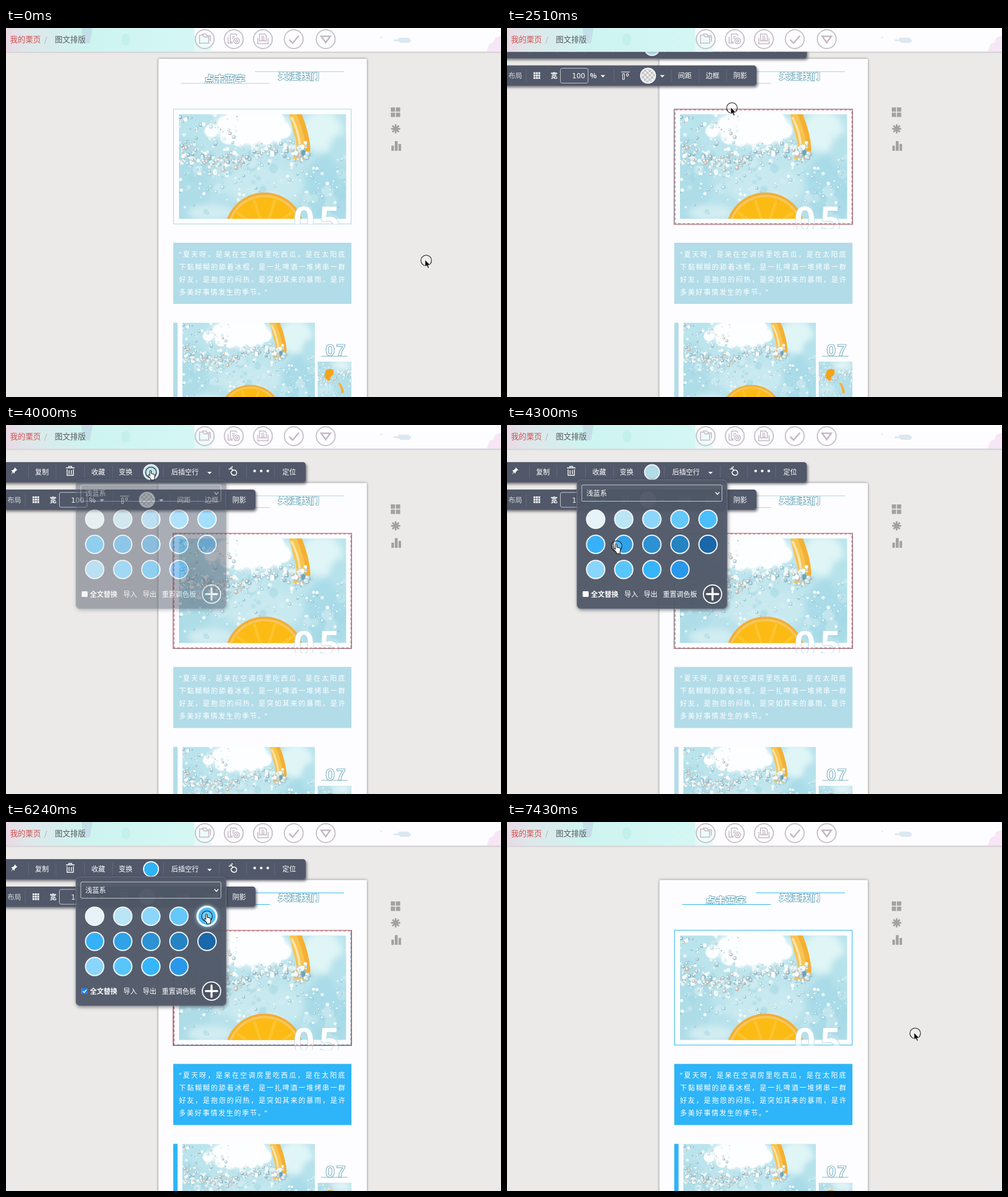
An HTML page for the animation above (8000 ms loop, 867 px wide and 646 px high).

```html
<!DOCTYPE html>
<html lang="zh-CN">
<head>
<meta charset="utf-8">
<style>
html, body { margin: 0; width: 100%; height: 100%; overflow: hidden; background: #ebeae9; }
svg { display: block; width: 867px; height: 646px; }
text { font-family: 'Noto Sans CJK SC', 'Noto Sans CJK', 'Noto Sans', sans-serif; font-size: 12px; white-space: pre; }
.bar > rect:first-child { fill: #515869; }
.bar { filter: drop-shadow(2px 3px 2px rgba(40, 40, 50, .6)); }
.bar text, #palette text { fill: #fff; }
.sep { stroke: #626979; }
.ring { stroke: #f4f6f8; stroke-width: 2; }
.accent { fill: var(--fill); }
.line { stroke: var(--line); fill: none; }
.outline { font-size: 18px; fill: #fff; stroke: #6fa9bb; stroke-width: 1.8; paint-order: stroke; font-weight: 900; }
.body { fill: #fff; font-weight: 500; }
.quote { font-family: 'Noto Sans', sans-serif; }
.big { font: 700 66px 'Noto Sans', 'Open Sans', sans-serif; fill: #fff; stroke: #a9d5e2; stroke-width: .8; letter-spacing: 7px; }
.small { font: 700 30px 'Liberation Sans', sans-serif; fill: #fff; stroke: #7db1c4; stroke-width: 1.2; letter-spacing: 2px; }
</style>
</head>
<body>
<svg id="stage" viewBox="0 0 867 646"></svg>
<script>
const stage = document.getElementById('stage');

let seed = 7;
const rnd = () => (seed = (seed * 16807) % 2147483647) / 2147483647;
const span = (a, b) => a + rnd() * (b - a);
const bell = () => (rnd() + rnd() + rnd() - 1.5) / 1.5;
const pick = list => list[Math.floor(rnd() * list.length)];
const times = (n, f) => Array.from({ length: n }, (_, i) => f(i)).join('');

const text = (x, y, s, attrs = '') => `<text x="${x}" y="${y}" ${attrs}>${s}</text>`;
const rect = (x, y, w, h, attrs = '') => `<rect x="${x}" y="${y}" width="${w}" height="${h}" ${attrs}/>`;
const disc = (x, y, r, attrs = '') => `<circle cx="${x}" cy="${y}" r="${r}" ${attrs}/>`;
const blob = (x, y, rx, ry, fill) => `<ellipse cx="${x}" cy="${y}" rx="${rx}" ry="${ry}" fill="${fill}"/>`;
const path = (d, attrs = '') => `<path d="${d}" ${attrs}/>`;
const seps = (list, y) => list.map(x => path(`M${x} ${y}v22`, 'class="sep"')).join('');
const caret = (x, y) => path(`M${x - 4} ${y}h8l-4 4z`, 'fill="#fff"');
const labels = (list, y, attrs) => list.map(([x, s]) => text(x, y, s, attrs)).join('');
const dot = (x, y, r, fill) => disc(x.toFixed(1), y.toFixed(1), r.toFixed(1), `fill="${fill}"`);

// a bubble is a tinted disc with a pale highlight
const bubble = (x, y, r, fill) => dot(x, y, r, fill) + (r > 1.8 ? dot(x - r * .25, y - r * .2, r * .5, '#f1fafb') : '');

function bubbles() {
  const greys = ['#a3c4ce', '#b3d2da', '#c9e2e7', '#94bac7', '#eef8f9', '#dceff2', '#c6bcb2', '#fff'];
  const blues = ['#a3d2de', '#b0dae4', '#f0fafb', '#fff', '#94c5d4', '#daf0f4'];
  const band = times(260, () => {
    const x = span(5, 228);
    return bubble(x, 72 + 12 * Math.sin(x / 38) + bell() * 26, span(.8, 4.2), pick(greys));
  });
  const loose = times(150, () => bubble(span(0, 292), 112 + bell() * 72, span(.5, 3.4), pick(blues)));
  const rising = times(60, () => bubble(span(0, 105), span(2, 62), span(.7, 3.6), pick(greys)));
  return band + loose + rising;
}

const foam = times(70, () => dot(122 + bell() * 75, 20 + bell() * 34, span(5, 14), '#fdfeff'));
const glints = times(55, () => dot(span(0, 292), span(70, 183), span(3, 11), pick(['#d8eff4', '#a5d7e4', '#c9e9ef'])));

const slice = disc(150, 207, 70, 'fill="#f3ae35"') + disc(150, 207, 66, 'fill="#f8c65c"') +
  disc(150, 207, 62, 'fill="#fcbb14"') +
  times(4, i => {
    const a = Math.PI * (1.2 + i * .2);
    return path(`M150 207L${150 + 60 * Math.cos(a)} ${207 + 60 * Math.sin(a)}`, 'stroke="#fdc42e" stroke-width="5"');
  });

const peel = path('M193 0H215Q228 32 230 60Q229 78 214 82L199 77Q211 60 201 33Z', 'fill="#f8c450"') +
  path('M206 0H215Q228 32 230 60Q229 74 222 76Q224 42 206 0Z', 'fill="#f4b033"') +
  path('M197 5Q210 30 212 58', 'fill="none" stroke="#fbe3ac" stroke-width="4"') +
  disc(214, 66, 9, 'fill="#9ec3cf"') + disc(216, 67, 5.5, 'fill="#6ba5ba"') + disc(211, 63, 3.5, 'fill="#dcedf1"');

const water = rect(0, 0, 293, 183, 'fill="url(#water)"') + '<g filter="url(#soft)">' +
  blob(10, 120, 45, 80, '#aedde8') + blob(262, 130, 45, 60, '#a9dbe8') +
  blob(150, 125, 70, 35, '#c8e9ef') + blob(250, 30, 36, 36, '#dff5f6') + blob(285, 65, 22, 30, '#b6e2eb') +
  blob(128, 22, 66, 30, '#fff') + blob(55, 172, 40, 14, '#d2edf2') + '</g>' +
  `<g filter="url(#blur)">${foam}<g opacity=".55">${glints}</g></g>`;

const defs = `<defs>
  <linearGradient id="water" x2="0" y2="1"><stop stop-color="#b9e4ed"/><stop offset=".5" stop-color="#bfe5ed"/><stop offset="1" stop-color="#b3dfea"/></linearGradient>
  <linearGradient id="wash"><stop stop-color="#ead9e5"/><stop offset=".1" stop-color="#dfe6ea"/><stop offset=".42" stop-color="#cef4f0"/><stop offset="1" stop-color="#d4f7f4"/></linearGradient>
  <filter id="soft"><feGaussianBlur stdDeviation="6"/></filter>
  <filter id="blur"><feGaussianBlur stdDeviation="1"/></filter>
  <filter id="lens"><feGaussianBlur stdDeviation=".5"/></filter>
  <pattern id="check" width="8" height="8" patternUnits="userSpaceOnUse"><path fill="#eee" d="M0 0h8v8H0z"/><path fill="#c4c4c4" d="M0 0h4v4H0zM4 4h4v4H4z"/></pattern>
  <clipPath id="photoClip">${rect(0, 0, 292.5, 183)}</clipPath>
  <clipPath id="thumbClip">${rect(546, 584, 59, 90)}</clipPath>
  <clipPath id="headA">${rect(300, 70, 170, 27)}</clipPath>
  <clipPath id="headB">${rect(430, 77, 170, 27)}</clipPath>
  <clipPath id="numClip"><rect id="numBox" x="490" y="300" width="115" height="43"/></clipPath>
  <g id="bubbles" filter="url(#lens)">${bubbles()}</g>
  <g id="photo" clip-path="url(#photoClip)">${water}${peel}<use href="#bubbles"/>${slice}</g>
</defs>`;

const bodyLine = (x, y, s, gap) => text(x, y, s, `class="body" letter-spacing="${gap}"`);
const quote = (x, y, s) => text(x, y, s, 'class="body quote"');

const thumb = `<g clip-path="url(#thumbClip)">${rect(546, 584, 59, 90, 'fill="#b3dfe9"')}
  <g filter="url(#soft)">${blob(588, 590, 18, 9, '#e6f6f8')}${blob(560, 634, 14, 9, '#d3edf3')}</g>
  <use href="#bubbles" transform="translate(540 573) scale(.32 .5)"/>
  ${path('M560 600q7-6 14-1l-1 9q-6 1-6 10q-8-2-9-10z', 'fill="#f5a31a"')}
  ${path('M584 620q7 8 8 18l-5 2q1-9-5-17z', 'fill="#f3b13a"')}</g>`;

const page = `<g id="page">
  ${rect(267, 54, 365, 720, 'rx="2" fill="#fdfdff" style="filter:drop-shadow(0 0 2px rgba(0,0,0,.45))"')}
  <g clip-path="url(#headA)">${text(347, 97, '点击蓝字', 'class="outline"')}</g>
  <g clip-path="url(#headB)">${text(476.5, 90, '关注我们', 'class="outline"')}</g>
  ${path('M307 97H462M436 76.5H592', 'class="line"')}
  <use href="#photo" x="303" y="151"/>
  ${rect(293.5, 142, 311, 201, 'class="line"')}
  <g clip-path="url(#numClip)">${text(503, 360, '05', 'class="big"')}</g>
  <g id="hover">${rect(293.5, 142, 311, 201, 'fill="none" stroke="#4cbbdc" stroke-dasharray="4 1.5"')}</g>
  <g id="picked" fill="none">${rect(292.5, 142, 313, 202, 'stroke="#ab6068"')}
    ${rect(294.5, 143.5, 309.5, 199, 'stroke="#c2606a" stroke-dasharray="5 3"')}</g>
  <g id="spacer">${rect(293.5, 109, 311, 23, 'fill="none" stroke="#4fb9d2" stroke-dasharray="4 2"')}</g>
  ${rect(293, 376, 312, 107, 'class="accent"')}
  ${quote(303, 400.5, '“')}
  ${bodyLine(310, 400.5, '夏天呀，是呆在空调房里吃西瓜，是在太阳底', 2.3)}
  ${bodyLine(303, 422.5, '下黏糊糊的舔着冰棍，是一扎啤酒一堆烤串一群', 1.95)}
  ${bodyLine(303, 444.5, '好友，是抱怨的闷热，是突如其来的暴雨，是许', 1.95)}
  ${bodyLine(303, 466.5, '多美好事情发生的季节。', 1.8)}${quote(453, 466.5, '”')}
  ${rect(293, 516, 7.5, 200, 'class="accent"')}
  <use href="#photo" transform="translate(309 516) scale(.793)"/>
  ${text(559.5, 574, '07', 'class="small"')}
  ${path('M552 574.5H598', 'stroke="#7db1c4"')}
  ${thumb}
</g>`;

const side = `<g id="side" fill="#a2a2a2">
  ${path('M674 139h7.5v7.5h-7.5zM683 139h7.5v7.5h-7.5zM674 148.3h7.5v7.5h-7.5zM683 148.3h7.5v7.5h-7.5z')}
  <g stroke="#a2a2a2" stroke-width="3">${times(4, i => path('M674.5 176.5h16', `transform="rotate(${i * 45} 682.5 176.5)"`))}</g>
  ${path('M675 206h4.5v9h-4.5zM681 198h5v17h-5zM687.5 203h4.5v12h-4.5z')}
</g>`;

const bars = `<g id="bars"><g class="bar">
  ${rect(-8, 65, 533, 35.5, 'rx="5"')}${seps([39.5, 87.5, 137.5, 186.5, 275.5, 373.5, 421.5, 470.5], 71)}
  ${path('M15 74l5 5-2 .5-3 3 0 3-2.5-2.5-4 4 3-5-2.5-2.5 3-.5 3-3z', 'fill="#fff"')}
  ${path('M105 75h15M110 75v-2.5h5v2.5M107 77.5v10.5h11v-10.5M110.5 79v7M114.5 79v7', 'fill="none" stroke="#fff" stroke-width="1.4"')}
  ${labels([[51, '复制'], [149.5, '收藏'], [197.5, '变换'], [289.5, '后插空行'], [484, '定位']], 87)}
  ${disc(254, 82.5, 13, 'class="accent ring"')}${caret(356.5, 82)}
  ${path('M393 74l5 6M390 77h4M396 72v3M397 79q6-1 7 4q0 5-4 5q-5 0-6-5z', 'fill="none" stroke="#fff" stroke-width="1.5"')}
  ${[435.5, 447, 458.5].map(x => disc(x, 80.5, 2.3, 'fill="#fff"')).join('')}
  </g><g class="bar">
  ${rect(-8, 113, 445, 35.5, 'rx="5"')}${seps([33.5, 187.5, 287.5, 336.5, 384.5], 120)}
  ${text(2.5, 135.5, '布局', 'opacity=".75"')}
  ${times(9, i => rect(46.5 + i % 3 * 4.2, 125 + Math.floor(i / 3) * 4.2, 3.2, 3.2, 'fill="#fff"'))}
  ${text(76.5, 135.5, '宽', 'font-weight="700"')}
  ${rect(93.5, 118, 48.5, 26, 'rx="3" fill="none" stroke="#c6cad2"')}
  ${text(137, 135.5, '100', 'text-anchor="end" style="font-family:\'DejaVu Sans\',sans-serif"')}
  ${text(145.5, 135.5, '%', 'font-weight="700"')}${caret(168, 130)}
  ${path('M200 124.5h15M202.5 127.5h3v10h-3zM209.5 127.5h3v4h-3z', 'fill="none" stroke="#fff"')}
  ${disc(247, 131, 13, 'class="ring" fill="url(#check)"')}${caret(272, 130)}
  ${labels([[299.5, '间距'], [348, '边框'], [396.5, '阴影']], 135.5)}
</g></g>`;

const colors = '#e6f3f8 #b9e5f5 #8dd6fb #64c8fa #4abffc #36b1f8 #30a2e8 #2c92d3 #2483c3 #1a67a9 #8ad5fb #58c6fd #35b6fc #2a98ea'.split(' ');
const swatches = colors.map((c, i) =>
  disc(155.3 + i % 5 * 49.2, 165 + Math.floor(i / 5) * 44, 16, `class="ring" fill="${c}"`)).join('');

const palette = `<g id="palette">
  ${rect(122.5, 96, 263, 225.5, 'rx="7" fill="#515a6b" fill-opacity=".9" stroke="#6f7786" style="filter:drop-shadow(1px 2px 3px rgba(40,40,50,.6))"')}
  ${rect(131, 105, 245.5, 28.5, 'rx="2" fill="none" stroke="#c9cdd4"')}
  ${text(139, 123.5, '浅蓝系')}${path('M365 117.5l3.5 4 3.5-4', 'fill="none" stroke="#fff" stroke-width="1.5"')}
  ${disc(352, 165, 18.5, 'id="glow" fill="#fff" style="filter:drop-shadow(0 0 3px #8fdcff)"')}
  ${swatches}
  ${rect(132.5, 291, 10.5, 10, 'rx="1.5" fill="#fff"')}
  <g id="tick">${rect(132.5, 291, 10.5, 10, 'rx="1.5" fill="#1f7df0"')}${path('M134.8 296l2.2 2.5 4-5', 'fill="none" stroke="#fff" stroke-width="1.6"')}</g>
  ${text(147, 300.5, '全文替换', 'font-weight="700"')}
  ${labels([[205.5, '导入'], [239.5, '导出'], [273, '重置调色板']], 300.5)}
  ${disc(360, 296, 16, 'class="ring" fill="#4b5262"')}${path('M350 296h20M360 286v20', 'stroke="#fff" stroke-width="3.5" stroke-linecap="round"')}
</g>`;

const icons = [
  [348, 'M-9-7h6l2 3h8v11h-16zM-4-7v-2h6l2 3h6v10'],
  [399, 'M-10-4v11h8M-6-9h9l3 3M-6-9v14h4M-3-4h5M-3-1h3M5-2a5 5 0 1 0 .1 0M5 1a2 2 0 1 0 .1 0'],
  [450, 'M-6-9h9l3 3v9h-12zM-3-5h5M-3-2h6M-3 1h6M-9-2v10h18v-10'],
  [504, 'M-8 1l6 6 11-13'],
  [560, 'M-8-5h16l-8 11z'],
].map(([x, d], i) => `<g transform="translate(${x} 19.5)" fill="none">
  ${disc(0, 0, 16.5, 'fill="#fff" fill-opacity=".35" stroke="#c4c1c7" stroke-width="2"')}
  ${path(d, `stroke="#c3b6c2" stroke-width="${i > 2 ? 2.5 : 1.5}"`)}</g>`).join('');

const header = `<g style="filter:drop-shadow(0 1px 1px rgba(90,80,100,.35))">${rect(0, 0, 867, 41.5, 'fill="#fdfcff"')}</g>
  ${rect(0, 0, 330, 41.5, 'fill="url(#wash)"')}
  ${rect(330, 14, 30, 27.5, 'fill="#e5f9f8"')}
  ${path('M132 0h20l-5 27h-9l-4-12z', 'fill="#c5dfe8"')}
  ${blob(210, 20, 8, 11, '#c4f0eb')}
  ${path('M679 20h8v-3h18l5 5-4 4h-15l-4-3h-8z', 'fill="#dce8f1"')}${rect(656, 15, 3, 3, 'fill="#e5edf4"')}
  ${path('M842 41l5-13 7-3 3-8 10-3v27z', 'fill="#f7e6f6"')}
  ${icons}
  ${text(7, 25, '我的栗页', 'fill="#d0504f" style="font-size:13.5px"')}
  ${text(67, 25, '/', 'fill="#aaa" style="font-size:13px"')}
  ${text(85.5, 25, '图文排版', 'fill="#565a5e" style="font-size:13.5px"')}`;

const beam = 'M-3-5q3 0 3 2v7q0 2-3 2M3-5q-3 0-3 2v7q0 2 3 2';
const cursor = `<g id="cursor">
  ${disc(0, 0, 9.3, 'fill="#fff" fill-opacity=".2" stroke="#111" stroke-width="1.1"')}
  <g id="arrow">${path('M-2-1v12l3-2.5 2 5 2-1-2-4.5h4z', 'fill="#000" stroke="#fff" stroke-width=".7"')}</g>
  <g id="move">${disc(0, 0, 8.6, 'fill="#fff"')}${path('M-5 1.5h10M0-4v11', 'stroke="#000" stroke-width="1.8"')}
    ${path('M-7 1.5l3-3v6zM7 1.5l-3-3v6zM0-5.5l-3 3h6zM0 8.5l-3-3h6z')}</g>
  <g id="beam" fill="none">${path(beam, 'stroke="#fff" stroke-width="2.6"')}${path(beam, 'stroke="#222"')}</g>
  <g id="hand">${path('M-2-3q1.5-1.5 2.5 0v5l5 1.2q1.5.5 1.3 2l-.8 5v3h-6.5v-2.5l-4.5-5q0-2 2-1l1 1z', 'fill="#fff" stroke="#000"')}</g>
</g>`;

stage.innerHTML = defs + page + side + bars + header + palette + cursor;

const $ = id => document.getElementById(id);
const show = (id, on) => { $(id).style.opacity = +on; };
const move = (id, x, y) => $(id).setAttribute('transform', `translate(${x} ${y})`);

// cursor stops: step, x, y
const stops = [
  [0, 736, 407], [3, 736, 407], [10, 602, 168.5], [11, 602, 168.5], [15, 394, 140], [21, 394, 140],
  [26, 254, 83], [27, 254, 83], [29, 192, 212], [32, 141, 296], [33, 141, 296], [40, 352, 165],
  [43, 352, 165], [46, 711, 371], [47, 711, 371], [48, 715, 370], [60, 715, 370],
];

function cursorAt(n) {
  const i = stops.findIndex(s => s[0] > n) - 1;
  const [a, x, y] = stops[i], [b, u, v] = stops[i + 1];
  const k = (n - a) / (b - a), e = k * k * (3 - 2 * k);
  return [x + (u - x) * e, y + (v - y) * e];
}

const cursorKind = n => n < 10 ? 'arrow' : n < 16 ? 'move' : n < 20 ? 'arrow' : n < 23 ? 'beam' : n < 45 ? 'hand' : 'arrow';

function draw(ms) {
  const n = Math.floor((ms + 25) / 148.7);
  const scroll = n < 19 ? 0 : n < 20 ? 24 : 47.5;
  const lag = { 19: 24, 20: 47, 21: 25.5, 22: 8 }[n] || 0;
  const blue = n >= 42, selected = n >= 16 && n < 48;

  stage.style.setProperty('--fill', blue ? '#2eb4f8' : '#b2dce8');
  stage.style.setProperty('--line', blue ? '#29b2ee' : '#a3d3df');
  move('page', 0, scroll);
  move('bars', 0, scroll - 47.5);
  move('side', 0, lag);
  show('bars', selected);
  show('hover', n >= 9 && n < 16);
  show('picked', selected);
  show('spacer', n >= 20 && n < 23);
  $('numBox').setAttribute('height', selected ? 52 : 43);
  show('palette', n < 27 || n >= 45 ? 0 : n === 27 || n === 44 ? .5 : 1);
  show('tick', n >= 33);
  show('glow', n >= 39 && n < 44);
  move('cursor', ...cursorAt(n));
  for (const kind of ['arrow', 'move', 'beam', 'hand']) show(kind, kind === cursorKind(n));
}

const start = performance.now();
function tick() {
  draw((performance.now() - start) % 8000);
  requestAnimationFrame(tick);
}
tick();
</script>
</body>
</html>
```
